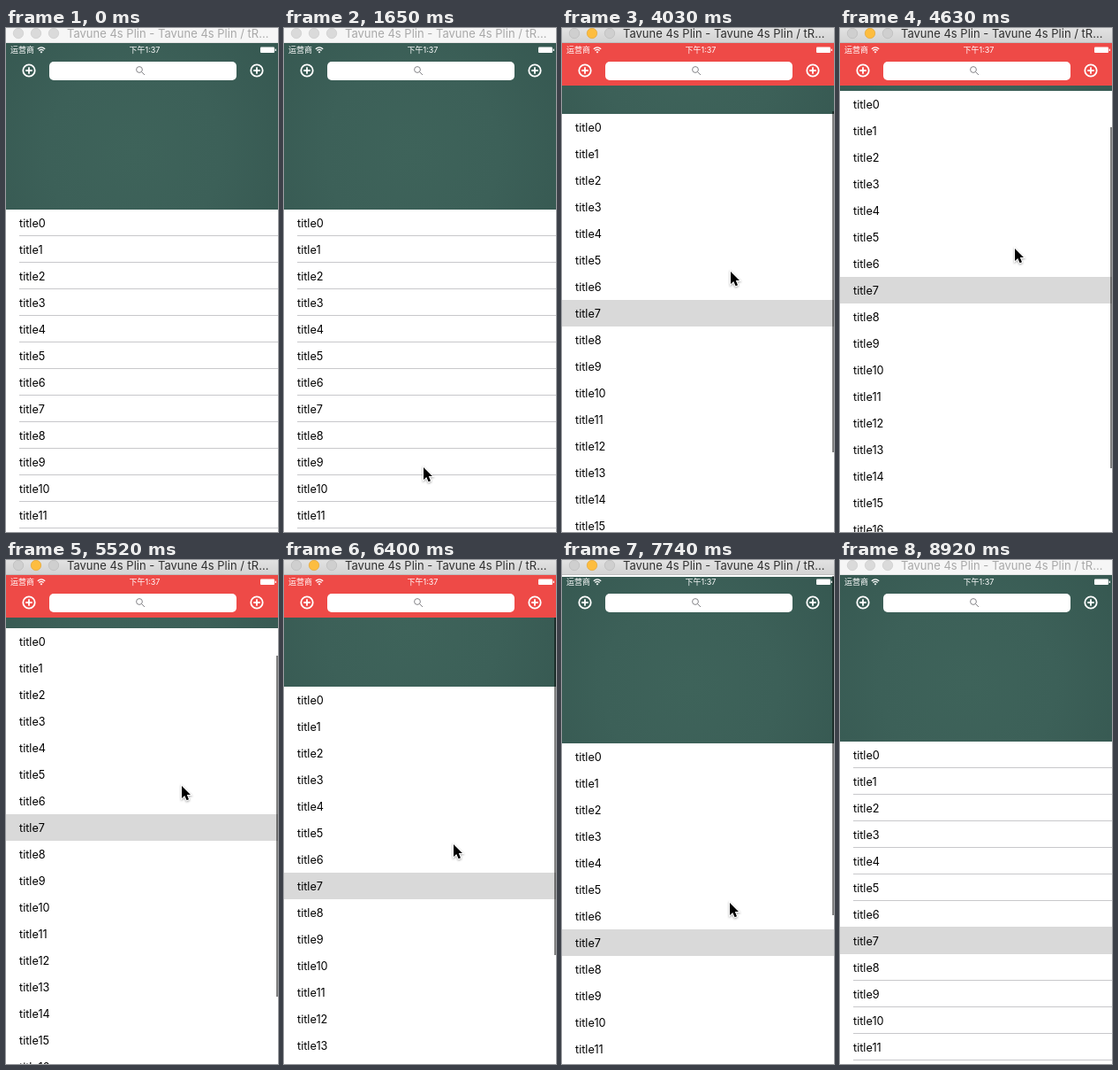
An HTML page that plays this animation: 308 px wide and 569 px high, repeating every 9.02 s.

```html
<!DOCTYPE html>
<html lang="zh">
<head>
<meta charset="utf-8">
<style>
html, body { margin: 0; width: 100%; height: 100%; overflow: hidden; background: #fff; }
svg { display: block; width: 308px; height: 569px; }
text { font-family: Inter, "Noto Sans CJK SC", "Noto Sans CJK", sans-serif; }
.row { font-size: 12.7px; fill: #000; }
.status { font-size: 9px; fill: #fff; }
.title { font-size: 13px; fill: #a9a9a9; }
#top { fill: #f6f6f6; }
#edge { fill: #e4e4e4; }
#dots { fill: #dadada; stroke: #ccc; stroke-width: .7px; }
.active #top { fill: url(#chrome); }
.active #edge { fill: #bebebe; }
.active .title { fill: #303030; }
.active #dots { fill: #cfcfcf; stroke: #bababa; }
.active .mid { fill: #fdbd3f; stroke: #e3a535; }
#cursor { stroke: #fff; stroke-width: 2px; paint-order: stroke; filter: drop-shadow(0 1px 1px rgba(0,0,0,.35)); }
</style>
</head>
<body>
<svg id="stage" viewBox="0 0 308 569">
  <defs>
    <radialGradient id="board" gradientUnits="userSpaceOnUse" cx="145" cy="140" r="200">
      <stop offset="0" stop-color="#3e635a"/>
      <stop offset=".5" stop-color="#3c6058"/>
      <stop offset="1" stop-color="#365851"/>
    </radialGradient>
    <linearGradient id="chrome" x2="0" y2="1">
      <stop offset="0" stop-color="#e2e2e2"/>
      <stop offset="1" stop-color="#d2d2d2"/>
    </linearGradient>
    <clipPath id="screen"><rect y="17" width="308" height="552"/></clipPath>
    <g id="plus" fill="none" stroke="#fff" stroke-width="1.8">
      <circle r="6.7"/><path d="M-3.7 0H3.7M0-3.7V3.7"/>
    </g>
  </defs>
  <rect width="308" height="569" fill="#fff"/>
  <g clip-path="url(#screen)">
    <g id="list">
      <rect y="17" width="308" height="188" fill="url(#board)"/>
      <g id="lines" stroke="#c8c8cb"></g>
      <rect id="mark" width="308" fill="#d9d9d9"/>
      <g id="rows"></g>
    </g>
    <rect id="bar" x="306" width="2" fill="#000" fill-opacity=".5"/>
    <rect id="nav" y="17" width="308" height="48" fill="#ee4a47"/>
    <text class="status" x="5" y="28">运营商</text>
    <path d="M35.8 23.7Q40 20 44.2 23.7M37.4 25.5Q40 23.3 42.6 25.5" fill="none" stroke="#fff" stroke-width="1.3"/>
    <path d="M38.6 26.9Q40 25.8 41.4 26.9L40 28.4Z" fill="#fff"/>
    <text class="status" x="157" y="28" text-anchor="middle">下午1:37</text>
    <rect x="288" y="21.5" width="16" height="6.5" rx="1" fill="#fff"/>
    <rect x="304.7" y="23.5" width="1.3" height="2.5" rx=".5" fill="#fff"/>
    <use href="#plus" x="26" y="48"/>
    <use href="#plus" x="284" y="48"/>
    <rect x="49" y="38" width="212" height="21" rx="5" fill="#fff"/>
    <g fill="none" stroke="#858589"><circle cx="151" cy="47" r="3.4"/><path d="M153.5 49.5L157 53"/></g>
  </g>
  <rect id="top" width="308" height="17"/>
  <rect id="edge" y="16" width="308" height="1"/>
  <g id="dots">
    <circle cx="14" cy="6" r="5.7"/><circle class="mid" cx="34" cy="6" r="5.7"/><circle cx="54" cy="6" r="5.7"/>
  </g>
  <text class="title" x="69" y="11">Tavune 4s Plin - Tavune 4s Plin / tR...</text>
  <path id="cursor" d="M0 0V14L3.3 11L5.6 16.2L8 15.2L5.8 10.1H10Z"/>
</svg>
<script>
const LOOP = 9020, ROWS = 20, ROW_H = 30, LIST_Y = 205, PICKED = 7;
const VIEW_Y = 17, VIEW_H = 552;
const RATIO = VIEW_H / (LIST_Y - VIEW_Y + ROWS * ROW_H);
const GRAB_Y = 383, RELEASE = 7800;

const $ = id => document.getElementById(id);
const clamp = (v, lo, hi) => Math.max(lo, Math.min(hi, v));
const set = (el, attrs) => { for (const k in attrs) el.setAttribute(k, attrs[k]); };
const show = (id, on) => { $(id).style.display = on ? '' : 'none'; };
const add = (parent, tag, attrs, text = '') => {
  const el = document.createElementNS('http://www.w3.org/2000/svg', tag);
  set(el, attrs);
  el.textContent = text;
  parent.append(el);
};

for (let i = 0; i < ROWS; i++) {
  const y = LIST_Y + i * ROW_H;
  add($('rows'), 'text', { class: 'row', x: 15, y: y + 19.5 }, 'title' + i);
  add($('lines'), 'path', { d: `M15 ${y + 29.5}H308` });
}

// Bursts of screen updates: first, last, count
const bursts = [
  [1350, 2090, 6], [2840, 3880, 8], [4030, 4780, 6],
  [5230, 6250, 8], [6400, 7440, 8], [7590, 8480, 7]
];

// Turning points of the pointer: time, x, y
const path = [
  [1350, 152, 543], [2090, 168, 426], [2840, 170, 401], [4030, 191, 275], [4780, 200, 243],
  [5520, 199, 255], [6400, 192, 321], [7730, 189, 385], [8480, 250, 580]
];

// Holds the time of the latest screen update
function snap(time) {
  const burst = bursts.findLast(b => b[0] <= time);
  if (!burst) return 0;
  const [first, last, count] = burst, step = (last - first) / (count - 1);
  const n = Math.min(count - 1, Math.floor((time - first + 5) / step));
  return first + n * step;
}

function pointer(t) {
  const i = clamp(path.findIndex(p => p[0] > t), 1, path.length - 1);
  const [a, b] = [path[i - 1], path[i]];
  const p = clamp((t - a[0]) / (b[0] - a[0]), 0, 1);
  return [1, 2].map(k => Math.round(a[k] + (b[k] - a[k]) * p));
}

// The list follows the pointer one to one until it is let go
function scroll(t, y) {
  if (t < 2900 || t > RELEASE) return 0;
  return Math.max(t > 7600 ? -2 : 0, GRAB_Y - y);
}

function draw(time) {
  const t = snap(time), [x, y] = pointer(t), off = scroll(t, y);

  set($('list'), { transform: `translate(0 ${-off})` });
  show('lines', off === 0);
  const cover = off === 0 ? 1 : 0;
  set($('mark'), { y: LIST_Y + PICKED * ROW_H - cover, height: ROW_H + cover });
  show('mark', t >= 1940);
  set($('nav'), { opacity: clamp(off / 60, 0, 1) });

  set($('bar'), {
    y: Math.round(VIEW_Y + 1 + Math.max(0, off) * RATIO),
    height: Math.round(VIEW_H * RATIO - 2 + Math.min(0, off)),
    opacity: t < 2900 ? 0 : clamp((8330 - t) / 300, 0, 1)
  });

  show('cursor', t >= 1350 && t < 8480);
  set($('cursor'), { transform: `translate(${x} ${y})` });
  $('stage').classList.toggle('active', t >= 1790 && time < 8920);
}

const start = performance.now();
function loop() {
  draw((performance.now() - start) % LOOP);
  requestAnimationFrame(loop);
}
loop();
</script>
</body>
</html>
```
